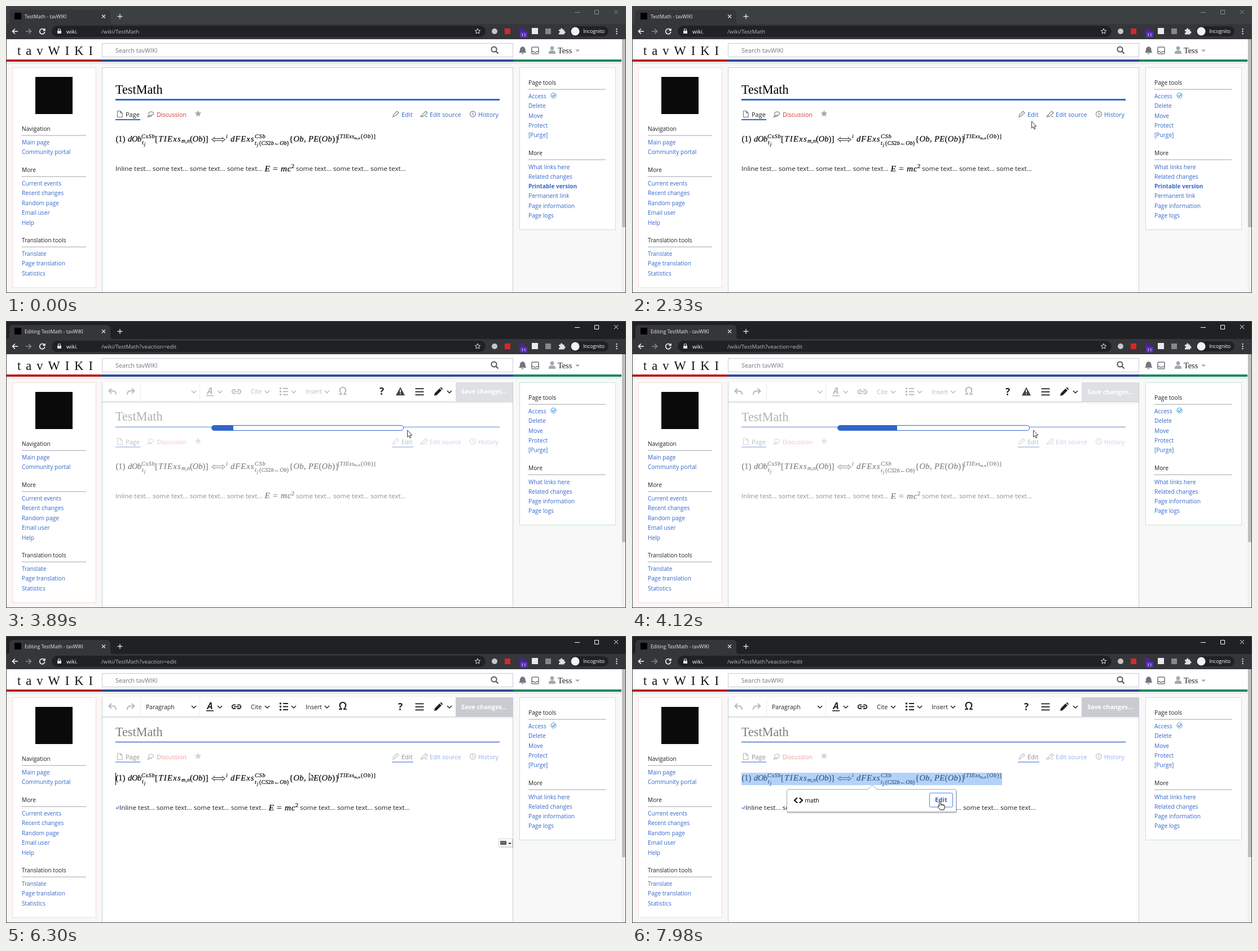
An HTML page for the animation above (8000 ms loop, 1099 by 510 pixels).

```html
<!DOCTYPE html>
<html lang="en">
<head>
<meta charset="utf-8">
<title>Wiki editor</title>
<style>
html, body { margin: 0; width: 100%; height: 100%; overflow: hidden; background: #f8f8f8 }
svg { display: block; width: 1099px; height: 510px; font-family: "Open Sans", "Noto Sans", sans-serif }
text { white-space: pre }
.serif { font-family: "Liberation Serif", "Times New Roman", serif }
.math { font-family: "Liberation Serif", serif; font-style: italic; stroke: #000; stroke-width: .2px }
.math tspan { font-style: normal }
</style>
</head>
<body>
<svg id="stage" viewBox="0 0 1099 510"></svg>
<script>
const BLUE = '#36c', INK = '#202122', GREY = '#a2a9b1', ICON = '#54595d';
const $ = id => document.getElementById(id);
const text = (x, y, s, size = 10.2, fill = INK, more = '') =>
  `<text x="${x}" y="${y}" font-size="${size}" fill="${fill}" ${more}>${s}</text>`;
const rect = (x, y, w, h, fill, more = '') =>
  `<rect x="${x}" y="${y}" width="${w}" height="${h}" fill="${fill}" ${more}/>`;
const box = (x, y, w, h, stroke, more = '') =>
  rect(x + .5, y + .5, w - 1, h - 1, '#fff', `stroke="${stroke}" ${more}`);
const circle = (x, y, r, fill, more = '') => `<circle cx="${x}" cy="${y}" r="${r}" fill="${fill}" ${more}/>`;
const line = (d, stroke, w = 1.4, more = '') =>
  `<path d="${d}" fill="none" stroke="${stroke}" stroke-width="${w}" ${more}/>`;
const shape = (d, fill, more = '') => `<path d="${d}" fill="${fill}" ${more}/>`;
const group = (id, s, more = '') => `<g id="${id}" ${more}>${s}</g>`;
const math = (x, y, s, size = 14.5, gap = 0) =>
  text(x, y, s.replace(/[()[\]{}\d=]/g, '<tspan>$&</tspan>'), size, '#000', `class="math" letter-spacing="${gap}"`);
const star = (x, y, r) => 'M' + Array.from({ length: 10 }, (_, i) => {
  const a = i * Math.PI / 5, q = i % 2 ? r * .45 : r;
  return `${x + q * Math.sin(a)} ${y - q * Math.cos(a)}`;
}).join('L') + 'Z';
const chevron = (x, color = INK) => line(`M${x - 4} 124l4 4 4-4`, color, 1.5);
const pencil = (x, y, color) => line(`M${x - 5} ${y + 5}l1-4L${x + 2} ${y - 5}l3 3L${x - 2} ${y + 4}Z`, color);

// Browser window
function browser() {
  const pale = '#dfe1e5';
  return rect(0, 0, 1099, 33, '#3c4043', 'id="strip"') +
    shape('M1 32Q6 32 6 27V14Q6 7 13 7H178Q185 7 185 14V27Q185 32 190 32Z', '#35363a') +
    rect(0, 32, 1099, 27, '#35363a') +
    rect(15, 12, 12, 12, '#000') +
    text(33, 22, '', 8.6, '#e8eaed', 'id="tabTitle"') +
    line('M170 15.500l6 6m0-6l-6 6', pale, 1.2) + line('M197.500 18.500h9m-4.500-4.500v9', pale, 1.3) +
    group('buttons', '<path d="M1008 11.500h9M1043.500 7.500h7v7h-7zM1078 7l7 7m0-7l-7 7" fill="none"/>') +
    line('M21 45H12m4-4.500L11.500 45l4.500 4.500', '#fff', 1.5) +
    line('M35 45h9m-4-4.500l4.500 4.500-4.500 4.500', '#8a8c90', 1.5) +
    line('M68 42.500a4.600 4.600 0 1 0 .8 3.500M69 40v3.500h-3.500', '#fff', 1.5) +
    rect(81, 35, 769, 20, '#202124', 'rx="10"') +
    rect(91, 44, 7, 5, pale) + line('M92.500 44v-1.500a2 2 0 0 1 4 0V44', pale, 1.1) +
    text(107, 48.5, 'wiki.', 9.6, '#fff') + text(169, 48.5, '', 9.85, '#b4b8bd', 'id="path"') +
    line(star(836, 45, 5), pale, 1) +
    circle(866, 45, 5, '#c4c7ca') + rect(884, 40, 10, 10, '#d9262c') +
    circle(914, 44, 5, '#4b2399') + rect(911, 46, 13, 10, '#5a30b5', 'rx="2"') +
    text(917.5, 54, '11', 8, '#fff', 'text-anchor="middle"') +
    rect(932, 39, 11, 11, '#e8eaed') + rect(956, 40, 10, 10, '#85888b') +
    shape('M980 42h3q-.5-2.500 1.700-2.500T986.400 42h3v3q2.300-.3 2.300 1.700t-2.300 1.700v2.100H980v-3q2 0 2-1.500t-2-1.500z', pale) +
    rect(1000, 36, 68, 18, '#202124', 'rx="9"') + circle(1009, 45, 7.5, '#f1f3f4') +
    text(1023, 48, 'Incognito', 8.75, '#fff') +
    [41, 45, 49].map(y => circle(1082.5, y, 1.2, pale)).join('');
}

function header() {
  return rect(0, 59, 1092, 451, '#f8f8f8') + rect(0, 59, 1092, 37, '#fff') + rect(0, 99, 1092, 4, '#000', 'opacity=".05"') +
    rect(0, 95, 170, 4, '#b8201f') + rect(170, 95, 729, 4, '#2f4d96') + rect(899, 95, 193, 4, '#148762') +
    text(20, 87, 'tavWIKI', 22.5, '#111', 'class="serif" letter-spacing="9"') +
    box(170, 66, 729, 25, '#c8ccd1') + text(194, 83, 'Search tavWIKI', 10.8, '#72777d') +
    circle(865, 77, 4.6, 'none', `stroke="${ICON}" stroke-width="2"`) + line('M868 80l4.500 4.500', ICON, 2.2) +
    shape('M909 83q2-2 2-5 0-5 4-5.500 0-2 1.500 0 4 .5 4 5.500 0 3 2 5zM913 84h5q-2.500 3-5 0z', '#72777d') +
    rect(932, 73, 12, 12, 'none', 'rx="1.500" stroke="#72777d" stroke-width="1.600"') +
    line('M932 81h3.500q2.500 3 5 0h3.500', '#72777d', 1.6) +
    circle(968, 75, 3.4, GREY) + shape('M962 85v-2q0-4 6-4t6 4v2z', GREY) +
    text(978, 84, 'Tess', 14.3, INK, 'class="serif"') + shape('M1009 77.500h8l-4 4z', GREY);
}

// Side panels: each entry is [baseline, label]
const links = (x, list) => list.map(([y, s]) => text(x, y, s, 10.2, BLUE)).join('');
const section = (x, y, s, w) => text(x, y, s) + rect(x, y + 7.5, w, 1.3, '#b4b8bd');
function panels() {
  return box(11, 109, 149, 392, '#fbd9cf') + rect(52, 126, 66, 66, '#0a0a0a') +
    section(28, 222, 'Navigation', 114) + links(28, [[246, 'Main page'], [263, 'Community portal']]) +
    section(28, 295, 'More', 114) +
    links(28, [[319, 'Current events'], [336, 'Recent changes'], [354, 'Random page'], [371, 'Email user'], [389, 'Help']]) +
    section(28, 420, 'Translation tools', 114) +
    links(28, [[444, 'Translate'], [461, 'Page translation'], [479, 'Statistics']]) +
    box(910, 109, 171, 289, '#bfe6da', 'id="rightBox"') + section(926, 140, 'Page tools', 137) +
    links(926, [[163.5, 'Access'], [181, 'Delete'], [198.5, 'Move'], [216, 'Protect'], [233, '[Purge]']]) +
    circle(970.5, 159, 4.5, 'none', 'stroke="#2a8fd8"') + line('M968 159l2 2 3.500-4', '#2a8fd8', 1.2) +
    section(926, 265, 'More', 137) + links(926, [[289.5, 'What links here'], [306.5, 'Related changes']]) +
    group('printLinks', text(926, 324, 'Printable version', 10.05, BLUE, 'font-weight="700"') + links(926, [[341, 'Permanent link']])) +
    group('lastLinks', links(926, [[358.5, 'Page information'], [376, 'Page logs']]));
}

function pageHead() {
  return text(194, 155.5, 'TestMath', 22.2, '#000', 'class="serif"') + rect(194, 165, 681, 3, BLUE) +
    line('M197.500 186.500h5l3.500 3.500v7.500h-8.500zm5 0v3.500h3.500', '#72777d', 1.2) +
    text(212, 197, 'Page', 11) + rect(194, 201, 44, 2, BLUE) +
    line('M253 192a4.500 3 0 1 1 4 2l-3 1.500zm1 3q-3 0-2.500 2.500l2-1.500q4 1 5-1.500', '#8d9197', 1.3) +
    text(267, 197, 'Discussion', 10.66, '#d33') + shape(star(340.5, 191.5, 6.3), GREY) +
    pencil(691, 192, '#8d9197') + text(701, 197, 'Edit', 11, BLUE, 'id="editLabel"') +
    rect(684, 201, 38, 2, GREY, 'id="editLine"') +
    pencil(742, 192, '#8d9197') + line('M736 194l-1 3.500m8-1h4', '#8d9197', 1.3) + text(751, 197, 'Edit source', 10.8, BLUE) +
    circle(827.5, 192, 5, 'none', 'stroke="#8d9197" stroke-width="1.300"') + line('M827.500 189v3.500l2.500 1', '#8d9197', 1.2) +
    text(837, 197, 'History', 10.8, BLUE);
}

function formula() {
  return math(194.5, 241, '(1)') + math(216, 241, 'dOb', 14.5, -.3) + math(240, 235, 'CsSb', 10.3, .8) +
    math(241, 246, 't', 10) + math(245, 248, 'j', 7.5) +
    math(264, 241, '[TIExs', 14.5, 1.4) + math(311, 243, 'm,n', 9.8, .2) + math(326, 241, '(Ob)]') +
    line('M368 235.500h17m-17 3.500h17M370 232.500q-2 3.500-5.500 4.800 3.500 1.300 5.500 4.800M383 232.500q2 3.500 5.500 4.800-3.500 1.300-5.500 4.800', '#000', .9) +
    math(390, 235, 'i', 10) + math(398, 241, 'dFExs', 14.5, 1.1) + math(441, 235, 'CSb', 10.3, .7) +
    math(441, 246.5, 't', 10) + math(445, 248.5, 'j', 7.5) + math(449, 246.5, '(CS2b←Ob)', 10, .2) +
    math(502, 241, '{Ob, PE(Ob)}', 14.5, .4) +
    math(588, 235, '[TIExs', 10, .5) + math(617, 236.500, 'm,n', 7, .2) + math(629, 235, '(Ob)]', 10, .9);
}

function inlineText() {
  const some = 'some text... some text... some text...';
  return text(194, 293, 'Inline test... ' + some, 11.66) + math(458.5, 293.5, 'E', 15.5) + math(473, 293.5, '=', 15.5) +
    math(487, 293.5, 'mc', 15.5, .6) + math(506, 288, '2', 10.3) + text(514, 293, some, 11.66);
}

function toolbar() {
  return rect(171, 109, 727, 34, '#fff') + rect(171, 143, 727, 1, '#c8ccd1') + rect(171, 144, 727, 3, '#000', 'opacity=".04"') +
    line('M183 124.500h7q5 0 5 6.500m-8-11l-4.500 4.500 4.500 4.500', '#b5b8bc', 2) +
    line('M227 124.500h-7q-5 0-5 6.500m8-11l4.500 4.500-4.500 4.500', '#b5b8bc', 2) +
    rect(238, 110, 1, 33, '#eaecf0') + rect(343, 110, 1, 33, '#eaecf0') +
    group('tools', text(248, 129.5, 'Paragraph', 10.5, INK, 'id="style"') +
      [333, 379, 463, 510, 569].map(x => chevron(x)).join('') +
      text(356.5, 130, 'A', 16, INK, 'font-weight="700" font-style="italic"') + rect(355, 132, 13, 1.6, INK) +
      line('M407 129h-3a3.300 3.300 0 0 1 0-6.600h3m3 0h3a3.300 3.300 0 0 1 0 6.600h-3m-6-3.300h9', INK, 1.8) +
      text(434, 129.5, 'Cite', 10.8) +
      [120, 125.5, 131].map(y => circle(486.5, y, 1.8, INK) + rect(491, y - 1, 9, 2, INK)).join('') +
      text(531, 129.5, 'Insert', 10.8) + text(589.5, 131, 'Ω', 19, INK, 'font-weight="600"')) +
    text(0, 131.5, '?', 17, INK, 'id="help" font-weight="700" text-anchor="middle"') +
    group('warning', shape('M699 117.500l8 15h-16z', '#404244') + rect(698.2, 122, 1.7, 5, '#fff') + rect(698.2, 128.5, 1.7, 1.7, '#fff')) +
    [119.5, 125, 130.5].map(y => rect(725.5, y, 15, 1.8, INK)).join('') +
    shape('M759 133l1-4.500 8.500-8.500 3.500 3.500-8.500 8.500zM769.500 119l1.500-1.300 3.300 3.300-1.300 1.500z', INK) + chevron(786) +
    rect(797, 109, 101, 34, '#c8ccd1', 'id="save"') + text(807, 129.5, 'Save changes...', 10.8, '#fff', 'font-weight="700"');
}

function overlays() {
  return group('progress', rect(364.5, 185.5, 340, 9, '#fff', `rx="4.500" stroke="${BLUE}"`) +
      `<clipPath id="pill">${rect(364.5, 185.5, 340, 9, '#000', 'rx="4.500"')}</clipPath>` +
      rect(364.5, 185.5, 0, 9, '#2f66cb', 'id="done" clip-path="url(#pill)"')) +
    rect(194, 243, 1, 22, '#000', 'id="caret"') +
    group('keyboard', rect(875, 361, 24, 15, '#000', 'opacity=".150"') + box(873, 360, 25, 15, '#d0d2d5') +
      rect(876, 364, 11, 7, '#555', 'rx="1"') + line('M877.500 366h8m-8 2h8', '#ddd', .8, 'stroke-dasharray="1 1"') +
      shape('M890 367.500h6l-3 3z', '#222')) +
    rect(194, 243, 462, 22, '#6da9f7', 'id="selection" opacity=".52"') +
    group('popup', rect(275, 274, 301, 41, '#000', 'opacity=".2" rx="2"') +
      box(274, 272, 301, 41, GREY, 'rx="2"') + shape('M418 273.500l8-8 8 8z', '#fff') + line('M418 272.500l8-7.500 8 7.500', GREY, 1) +
      line('M293 287.500l-5 4.500 5 4.500m4-9l5 4.500-5 4.500', '#000', 2) + text(306.5, 296, 'math', 10.4, '#000') +
      box(527, 278.5, 42, 26, GREY, 'id="button" rx="2"') +
      text(537, 295, 'Edit', 11.3, BLUE, 'font-weight="700"')) +
    group('tip', box(717, 205, 112, 19, '#767676') + text(722, 217.5, 'Edit this page [alt-shift-v]', 8.85, '#575757')) +
    circle(0, 0, 9, '#f3e52c', 'id="click" opacity=".750"') +
    group('arrow', shape('M.5 0V12.200L3.200 9.700 5 14 6.900 13.200 5.100 9H8.800Z', '#fff', 'stroke="#222" stroke-width=".900"')) +
    group('hand', shape('M-1.500 1.500Q0-.8 1.400 1.500V6l4.800 1q2 .5 2 2.500v2.500l-1.500 4h-6.200l-4-5.500q-.8-2 1.300-1.800l.7.800z', '#fff', 'stroke="#111"') +
      line('M1.400 6v2.500m2.300-2v2m2.300-1.500v2', '#111', .8));
}

$('stage').innerHTML =
  header() + panels() + box(170, 109, 729, 410, '#c8ccd1') +
  group('head', pageHead()) + group('formula', formula()) + group('inline', inlineText()) +
  line('M199.500 302v4h-4m1.700-2l-2 2 2 2', '#3f6fd0', 1, 'id="newline"') +
  '<clipPath id="below"><path d="M171 109h727v60H171z"/></clipPath>' +
  `<g clip-path="url(#below)">${group('toolbar', toolbar())}</g>` +
  rect(1091, 59, 7, 450, '#f1f1f1') + rect(1092, 59, 6, 334, '#bdbdbd') +
  browser() + overlays() + rect(.5, .5, 1098, 509, 'none', 'stroke="#484a4d"');

// Pointer path: time, x, y
const route = [[500, 19, 218], [1290, 402, 230], [2130, 691, 207], [2330, 708, 205], [2540, 709, 194],
  [3655, 709, 194], [3660, 711, 194], [5760, 711, 194], [6300, 537, 243], [6530, 533, 260], [7630, 533, 260], [7960, 546, 293]];
const ramp = (t, a, b) => Math.min(1, Math.max(0, (t - a) / (b - a)));
const ease = u => u * u * (3 - 2 * u);
function pointer(t) {
  const i = route.findIndex(k => k[0] > t);
  if (i < 0) return route.at(-1).slice(1);
  if (!i) return route[0].slice(1);
  const [a, x, y] = route[i - 1], [b, u, v] = route[i], f = ramp(t, a, b);
  return [x + (u - x) * f, y + (v - y) * f];
}
const show = (id, on) => $(id).style.display = on ? '' : 'none';
const set = (id, attrs) => { for (const k in attrs) $(id).setAttribute(k, attrs[k]); };
const move = (id, x, y) => set(id, { transform: `translate(${x} ${y})` });

function draw(t) {
  const focus = t >= 3510, edit = t >= 3660, ready = t >= 4400, picked = t >= 6700;
  const slide = ease(ramp(t, 3660, 3900)), hover = t >= 2400 && !edit, onButton = t >= 7830;

  set('strip', { fill: focus ? '#202124' : '#3c4043' });
  set('buttons', { stroke: focus ? '#fff' : '#8b8e91' });
  $('tabTitle').textContent = (edit ? 'Editing ' : '') + 'TestMath - tavWIKI';
  $('path').textContent = '/wiki/TestMath' + (edit ? '?veaction=edit' : '');

  show('printLinks', !edit);
  move('lastLinks', 0, edit ? -35 : 0);
  set('rightBox', { height: edit ? 253 : 288 });

  move('head', 0, 22 * slide);
  move('formula', 0, ready ? 16 : 22 * slide);
  move('inline', ready ? 7 : 0, ready ? 16 : 22 * slide);
  set('head', { opacity: ready ? .5 : 1 - .7 * slide });
  for (const id of ['formula', 'inline']) set(id, { opacity: ready ? 1 : 1 - .5 * slide });
  show('newline', ready);
  show('editLine', hover || edit);
  set('editLine', { fill: edit ? BLUE : GREY });
  set('editLabel', { fill: edit ? INK : BLUE });

  show('toolbar', edit);
  move('toolbar', 0, -38 * (1 - slide));
  set('tools', { opacity: ready ? 1 : .3 });
  set('save', { opacity: ready ? 1 : .6 });
  show('style', ready);
  show('warning', !ready);
  set('help', { x: ready ? 699 : 666 });

  show('progress', edit && !ready);
  set('done', { width: 340 * (.31 * ramp(t, 3760, 4120) + .69 * ramp(t, 4200, 4390)) });
  show('caret', ready && !picked && !(t >= 4690 && t < 5180) && !(t >= 5760 && t < 6250));
  show('keyboard', ready && !picked);
  show('selection', picked);
  show('popup', t >= 6800);
  set('button', { stroke: onButton ? '#447ff5' : GREY });
  show('tip', t >= 3060 && !focus);

  const [x, y] = pointer(t), hand = hover || onButton;
  show('click', focus && !edit || t >= 6610 && t < 6800);
  set('click', { cx: x + .5, cy: y + 2.5 });
  show('arrow', t >= 500 && !hand);
  show('hand', hand);
  move('arrow', x, y);
  move('hand', x, y);
}

const start = performance.now();
(function tick() {
  draw((performance.now() - start) % 8000);
  requestAnimationFrame(tick);
})();
</script>
</body>
</html>
```
